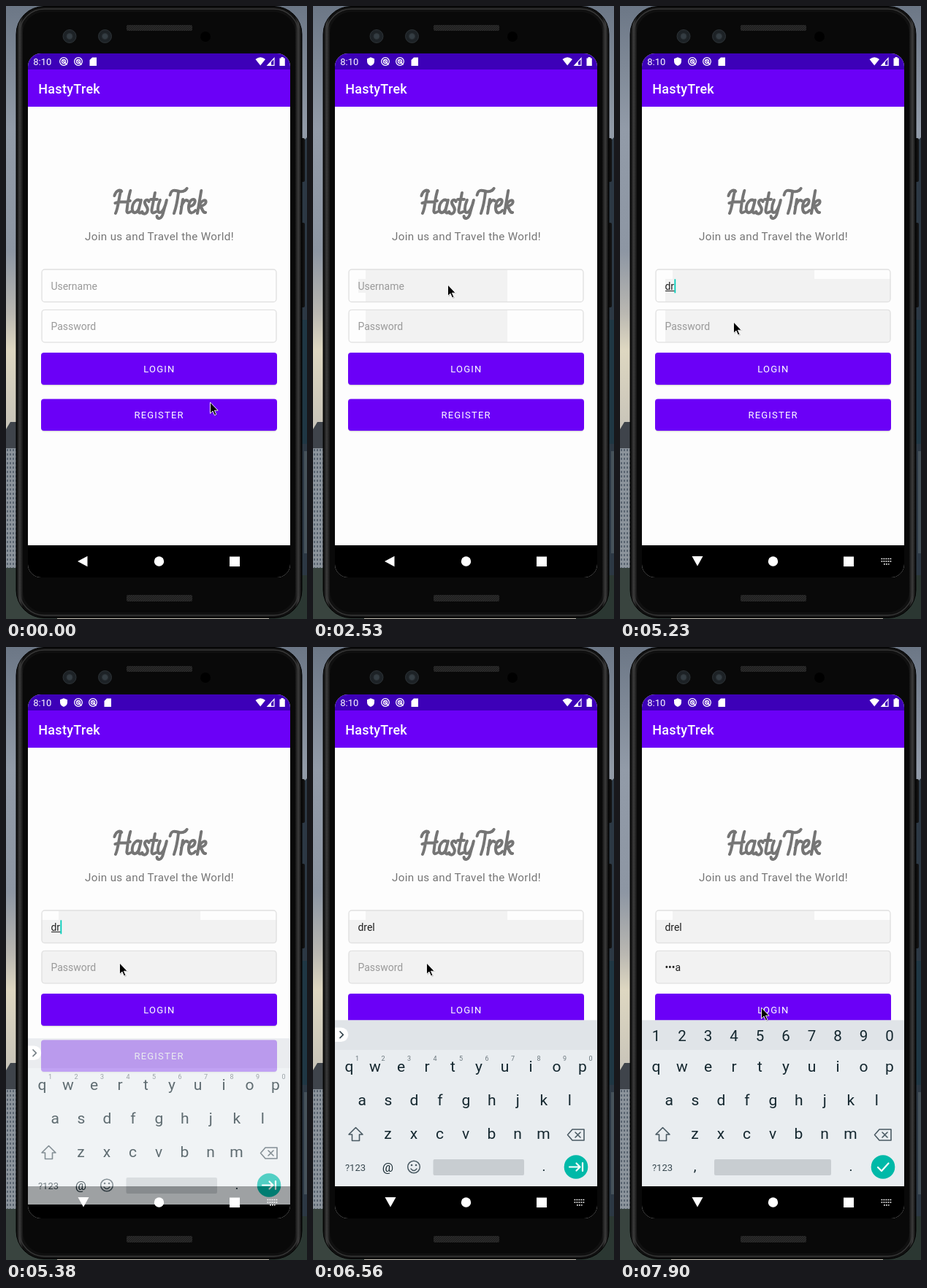
Recreate the animation shown at these times as an HTML page. Size 412 by 840 pixels, loop 8000 ms.

```html
<!DOCTYPE html>
<html lang="en">
<head>
<meta charset="utf-8">
<title>Login screen</title>
<style>
  html, body { margin: 0; width: 100%; height: 100%; overflow: hidden; background: #8b95a1; }
  svg { display: block; width: 412px; height: 840px; font-family: Roboto, sans-serif; }
  text { white-space: pre; }
  .mid { text-anchor: middle; }
  .btn { fill: #fff; font-size: 13px; letter-spacing: 1.2px; }
  .field { fill: none; stroke: #e1e1e1; stroke-width: 1.3; }
  .line { fill: none; stroke-linecap: round; stroke-linejoin: round; }
</style>
</head>
<body>
<svg viewBox="0 0 412 840" xmlns="http://www.w3.org/2000/svg">
  <defs>
    <linearGradient id="sky" x2="0" y2="1">
      <stop offset="0" stop-color="#6c7786"/>
      <stop offset=".2" stop-color="#929ba8"/>
      <stop offset=".4" stop-color="#8d96a3"/>
      <stop offset=".5" stop-color="#b9b7b1"/>
      <stop offset=".56" stop-color="#ded7c1"/>
      <stop offset=".68" stop-color="#c9c5b9"/>
    </linearGradient>
    <linearGradient id="rim">
      <stop offset="0" stop-color="#050505"/>
      <stop offset=".012" stop-color="#3c3c3c"/>
      <stop offset=".024" stop-color="#101010"/>
      <stop offset=".976" stop-color="#101010"/>
      <stop offset=".988" stop-color="#3c3c3c"/>
      <stop offset="1" stop-color="#050505"/>
    </linearGradient>
    <pattern id="mesh" width="3" height="3" patternUnits="userSpaceOnUse">
      <rect width="3" height="3" fill="#2b2b2b"/><path d="M0 3L3 0" stroke="#191919"/>
    </pattern>
    <pattern id="panes" width="4" height="6" patternUnits="userSpaceOnUse">
      <rect width="4" height="6" fill="#8c949c"/><rect x="1" y="1" width="2" height="3" fill="#596470"/>
    </pattern>
    <clipPath id="screen"><rect x="30" y="65" width="359" height="718" rx="18"/></clipPath>
    <clipPath id="fields">
      <rect x="48.5" y="361" width="322" height="45" rx="4"/>
      <rect x="48.5" y="416" width="322" height="45" rx="4"/>
    </clipPath>
    <g id="ring" fill="none" stroke="#fff" stroke-width="1.3">
      <circle r="5.3"/><circle r="2.5"/><path d="M-1 -1L4.5 4.5"/>
    </g>
  </defs>

  <rect width="412" height="840" fill="url(#sky)"/>
  <path d="M0 580L6 570H14V612H0Z" fill="#3f444b"/>
  <rect y="606" width="30" height="170" fill="url(#panes)"/>
  <rect y="770" width="70" height="70" fill="#39443f"/>
  <path d="M402 190L412 180V840H402Z" fill="#2c3844"/>
  <path d="M402 430H412V600H402Z" fill="#1f3744"/>
  <rect x="408" y="610" width="4" height="140" fill="#46525a"/>
  <rect x="360" y="780" width="52" height="60" fill="#2b3732"/>

  <rect x="403" y="181" width="6" height="60" rx="2" fill="#111"/>
  <rect x="403" y="297" width="6" height="116" rx="2" fill="#111"/>
  <rect x="14" y=".5" width="391" height="838" rx="38" fill="url(#rim)" stroke="#000"/>
  <rect x="18.5" y="4" width="382" height="831" rx="34" fill="none" stroke="#383838" stroke-width="1.3"/>
  <rect x="23" y="8" width="373" height="823" rx="30" fill="#090909"/>
  <rect x="165" y="26" width="90" height="8" rx="2" fill="url(#mesh)"/>
  <rect x="165" y="807" width="90" height="9" rx="2" fill="url(#mesh)"/>
  <g fill="#1d2226" stroke="#2d3337">
    <circle cx="87" cy="41.5" r="9"/><circle cx="135.5" cy="41.5" r="9"/>
    <circle cx="87" cy="41.5" r="4" fill="#343d43"/><circle cx="135.5" cy="41.5" r="4" fill="#343d43"/>
  </g>
  <circle cx="273" cy="42" r="7" fill="#000"/>

  <g clip-path="url(#screen)">
    <rect x="30" y="65" width="359" height="718" fill="#fdfdfd"/>
    <rect x="30" y="65" width="359" height="22" fill="#3d00b8"/>
    <rect x="30" y="87" width="359" height="51" fill="#6b00f7"/>
    <text x="37.3" y="81" font-size="13" fill="#fff">8:10</text>
    <path id="shield" fill="#fff" d="M79 70.2L84 72.2V76C84 79 82 81 79 82C76 81 74 79 74 76V72.2Z"/>
    <g id="icons">
      <use href="#ring" x="79" y="76"/><use href="#ring" x="99" y="76"/>
      <path fill="#fff" d="M118 70.5H124V82H114.5V74Z"/>
    </g>
    <g fill="#fff">
      <path d="M341.5 73Q348.2 67.500 355 73L348.2 81.500Z"/>
      <path d="M367 71.5V81.3H358Z" fill="none" stroke="#fff" stroke-width="1.2"/>
      <path d="M363 76V81.300H358Z"/>
      <path d="M374.500 71.500H376.500V70H379.800V71.500H381.800V82H374.500Z"/>
    </g>
    <text x="44.2" y="119.800" font-size="18" font-weight="500" letter-spacing=".3" fill="#fff">HastyTrek</text>

    <g class="line" role="img" aria-label="Hasty Trek" transform="translate(147 284) skewX(-6)" stroke="#757575" stroke-width="4">
      <path d="M7 -31C5 -20 6 -8 3 0M-1 -24C0 -31 5 -33 8 -30M20 -31C18 -20 18 -8 18 -3q1 4 5 1M1 -14C8 -18 14 -13 21 -17"/>
      <path d="M35 -17C30 -21 25 -15 25 -8C25 0 31 2 34 -6L36 -18L34 -4q1 6 5 2"/>
      <path d="M47 -16C44 -21 40 -17 42 -13C44 -9 48 -7 46 -2C44 2 40 1 39 -2"/>
      <path d="M54 -28L52 -5q0 7 6 3M49 -19h9"/>
      <path d="M62 -18C59 -9 60 -1 63 -1C67 -1 70 -8 71 -18L68 0C67 8 61 9 60 4"/>
      <path d="M86 -30C86 -20 85 -8 83 0M75 -25C76 -34 82 -31 87 -30C93 -29 96 -32 97 -34"/>
      <path d="M93 -19L92 0M92 -9C94 -16 97 -20 100 -17"/>
      <path d="M103 -9C112 -11 111 -20 107 -19C102 -18 101 -10 103 -4C105 1 109 0 112 -4"/>
      <path d="M117 -31L115 0M116 -9C118 -18 125 -20 125 -15C125 -11 120 -10 117 -9C122 -8 121 0 126 -1"/>
    </g>
    <text class="mid" x="210" y="321" font-size="15.200" letter-spacing=".33" fill="#757575">Join us and Travel the World!</text>

    <g id="shade" clip-path="url(#fields)" fill="#f2f2f2">
      <path d="M72 361H266V461H72Z"/>
      <path d="M62 374H72V393H62Z"/>
      <path d="M62 374H371V461H62Z"/>
      <path d="M48 374H371V461H48Z"/>
    </g>
    <rect class="field" x="49" y="361" width="321" height="44.500" rx="4"/>
    <rect class="field" x="49" y="416.300" width="321" height="44.500" rx="4"/>
    <g font-size="14">
      <text id="user" x="61.400" y="388.600"/>
      <text id="pass" x="61.400" y="443.600"/>
    </g>
    <rect id="under" x="62" y="390" height="1" fill="#212121"/>
    <rect id="caret" width="1.800" height="19" fill="#03cfbb"/>

    <g fill="#000" opacity=".12">
      <rect x="48.500" y="477" width="322" height="43.500" rx="4"/>
      <rect x="48.500" y="540" width="322" height="43.500" rx="4"/>
    </g>
    <rect x="48" y="475" width="323" height="44" rx="4" fill="#6b00f7"/>
    <rect x="48" y="538.500" width="323" height="43.500" rx="4" fill="#6b00f7"/>
    <text class="btn" x="188.300" y="502">LOGIN</text>
    <text class="btn" x="175.500" y="565.300">REGISTER</text>

    <rect x="30" y="739" width="359" height="44" fill="#000"/>
    <g id="board">
      <rect x="30" y="511.500" width="359" height="227.500" fill="#e9edf0"/>
      <rect x="30" y="511.500" width="359" height="40.500" fill="#e0e4e8"/>
      <g id="keys" fill="#14272f"></g>
      <text class="mid" x="58" y="717.500" font-size="13" fill="#37474f">?123</text>
      <g class="line" stroke="#4a5a63" stroke-width="1.600">
        <path d="M58.500 658.500L68 668H63.500V676.500H53.500V668H49Z"/>
        <path d="M355 661H371V676H355L348.500 668.500ZM359 665L366 672M366 665L359 672"/>
      </g>
      <g id="plain">
        <path d="M30 521.500H38.500A9.700 9.700 0 0 1 38.500 541H30Z" fill="#fff"/>
        <path class="line" d="M37 527L41.300 531.300L37 535.600" stroke="#37474f" stroke-width="1.700"/>
        <text class="mid" x="102.300" y="719" font-size="17" fill="#14272f">@</text>
        <g class="line" stroke="#4a5a63" stroke-width="1.500">
          <circle cx="138" cy="712.500" r="8.300"/><path d="M134 715Q138 720 142 715"/>
          <path d="M135 710h.1M141 710h.1" stroke-width="2.500"/>
        </g>
      </g>
      <text id="comma" class="mid" x="102.500" y="718" font-size="19" fill="#14272f">,</text>
      <rect id="space" y="702" height="22" rx="2" fill="#c8cdd1"/>
      <text class="mid" x="316" y="718" font-size="19" fill="#14272f">.</text>
      <circle cx="360" cy="712.500" r="16.300" fill="#00b9a8"/>
      <path id="enter" class="line" stroke="#fff" stroke-width="2.200"/>
    </g>

    <g fill="#fff">
      <path id="back"/>
      <circle cx="209.500" cy="761" r="6.700"/>
      <rect x="306" y="754.500" width="14" height="13.500"/>
      <path id="kbIcon" fill="none" stroke="#fff" stroke-width="1.600" d="M357.500 757.500H372M357.500 761H372M361 764.800H368.500" stroke-dasharray="1.800 1.200"/>
    </g>
  </g>

  <g id="mouse">
    <path d="M1.500 2V16.500L5 13L7.500 19L10 18L7.500 12H12.500Z" fill="#000" opacity=".2"/>
    <path d="M.5 0V15.300L4 12L6.500 17.800L8.900 16.800L6.400 11.200H11.200Z" stroke="#fff" stroke-width=".9"/>
  </g>
</svg>
<script>
const $ = id => document.getElementById(id);
const LOOP = 8000;

// Each track is a list of [start ms, value]; a value holds until the next one.
const tracks = {
  mouse: [[0, [279, 543]], [150, [270, 520]], [300, [255, 478]], [440, [230, 428]], [590, [212, 398]],
    [740, [207, 390]], [1640, [203, 389]], [1790, [195, 386]], [1940, [187, 383]], [2090, [184, 382]],
    [4330, [171, 408]], [4480, [163, 421]], [4630, [157, 430]], [4780, [155, 433]],
    [7750, [178, 470]], [7900, [193, 494]]],
  shade: [[0, 0], [440, 1], [1940, 2], [2980, 3], [5380, 4]],
  user: [[0, ''], [3880, 'd'], [5230, 'dr'], [5530, 'dre'], [5970, 'drel']],
  pass: [[0, ''], [6850, 'm'], [7000, '•e'], [7150, '••l'], [7300, '•••a']],
  caret: [[0, ''], [1940, 'user'], [2530, ''], [2980, 'user'], [3580, ''], [3880, 'user'], [4330, ''],
    [4780, 'user'], [6110, 'pass'], [6560, ''], [6850, 'pass'], [7900, '']],
  board: [[0, 'off'], [5380, 'rising'], [5530, 'plain'], [6850, 'digits']]
};

const at = (name, t) => tracks[name].reduce((v, [start, next]) => t >= start ? next : v, null);
const show = (el, on) => el.setAttribute('visibility', on ? 'inherit' : 'hidden');
const set = (el, attrs) => { for (const k in attrs) el.setAttribute(k, attrs[k]); };

function addRow(chars, x, y, size, cls, color) {
  const g = document.createElementNS('http://www.w3.org/2000/svg', 'g');
  set(g, { class: 'mid ' + cls, 'font-size': size, ...(color && { fill: color }) });
  [...chars].forEach((c, i) => {
    const key = document.createElementNS('http://www.w3.org/2000/svg', 'text');
    set(key, { x: x + i * 35.5, y });
    key.textContent = c;
    g.append(key);
  });
  $('keys').append(g);
  return g;
}
addRow('qwertyuiop', 49.5, 582, 21, 'letters');
addRow('asdfghjkl', 67.3, 627.5, 21, 'letters');
addRow('zxcvbnm', 102.5, 673.5, 21, 'letters');
const hints = addRow('1234567890', 60.5, 567, 9, 'hints', '#6b777e');
const digits = addRow('1234567890', 49.5, 540, 20.5, 'digits');

function drawField(id, hint, value) {
  const el = $(id);
  el.textContent = value || hint;
  el.setAttribute('fill', value ? '#212121' : '#9a9a9a');
  return value ? el.getComputedTextLength() : 0;
}

function draw(t) {
  const [mx, my] = at('mouse', t);
  set($('mouse'), { transform: `translate(${mx} ${my})` });

  const notified = t >= 440;
  show($('shield'), notified);
  set($('icons'), { transform: `translate(${notified ? 20 : 0} 0)` });
  const stage = at('shade', t);
  [...$('shade').children].forEach((el, i) => show(el, i < stage));

  const width = {
    user: drawField('user', 'Username', at('user', t)),
    pass: drawField('pass', 'Password', at('pass', t))
  };
  show($('under'), width.user && t < 6110);
  set($('under'), { width: width.user });
  const focus = at('caret', t);
  show($('caret'), focus);
  if (focus) set($('caret'), { x: 61.8 + width[focus], y: focus === 'user' ? 374.3 : 429.3 });

  const mode = at('board', t), rising = mode === 'rising', num = mode === 'digits';
  show($('board'), mode !== 'off');
  set($('board'), { opacity: rising ? 0.68 : 1, transform: `translate(0 ${rising ? 25 : 0})` });
  show($('plain'), !num);
  show(hints, !num);
  show(digits, num);
  show($('comma'), num);
  set($('space'), num ? { x: 129, width: 160 } : { x: 164.5, width: 124.5 });
  set($('enter'), { d: num ? 'M353 713L358 718L367.500 707.500' : 'M351 712.500H365M360.500 707.500L365.500 712.500L360.500 717.500M369 707V718' });

  const open = t >= 2980;
  set($('back'), { d: open ? 'M98.500 754H113.500L106 767.500Z' : 'M98 761L111.500 753.800V768.200Z' });
  show($('kbIcon'), open);
}

function frame() {
  draw(performance.now() % LOOP);
  requestAnimationFrame(frame);
}
frame();
</script>
</body>
</html>
```
